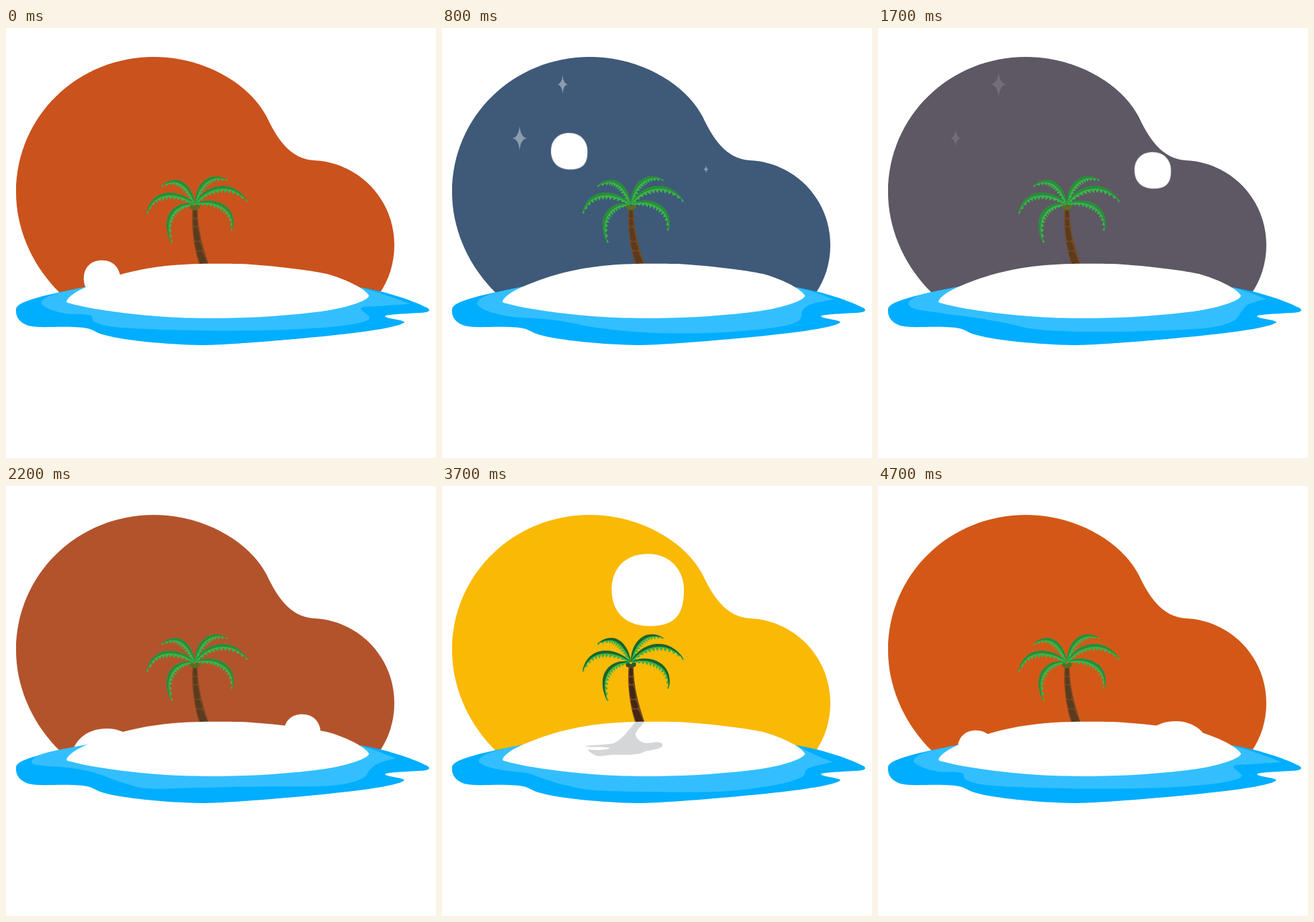
Animation, 640 px wide and 640 px high, one loop 4.8 s. Source, as an HTML page:

```html
<!DOCTYPE html>
<html lang="en">
<head>
<meta charset="utf-8">
<title>Island day and night</title>
<style>
  html, body { margin: 0; width: 100%; height: 100%; overflow: hidden; background: #fff; }
  svg { display: block; width: 100%; height: 100%; }
</style>
</head>
<body>
<svg viewBox="0 0 640 640" xmlns="http://www.w3.org/2000/svg">
  <defs>
    <path id="orb" d="M0-54C33-54 53-30 53.5-2C54 36 41 53 4 53.5C-34 54-54 32-54-1C-54-34-32-54 0-54Z"/>
    <path id="star" d="M0-19Q1.5-2 11 0Q1.5 2 0 19Q-1.5 2-11 0Q-1.5-2 0-19Z"/>
  </defs>
  <path id="sky" d="M80 394C40 355 15 300 15 245C15 130 108 43 220 43C300 43 365 87 388 132C402 162 422 195 458 197C525 200 578 255 578 323C578 350 570 375 556 395Z"/>
  <g id="stars" fill="#fff">
    <use href="#star"/><use href="#star"/><use href="#star"/>
  </g>
  <use id="moon" href="#orb" fill="#fff"/>
  <use id="sun" href="#orb" fill="#fff"/>
  <g id="palm">
    <path fill="#754a22" d="M278 266C275 295 280 330 288 353L302 353C293 325 285 300 285 266Z"/>
    <path id="bark"/>
    <path id="leaves" fill="#39b54a"/>
    <path id="ribs"/>
    <g id="nuts">
      <circle cx="277" cy="266.5" r="3.2"/><circle cx="281.5" cy="268" r="3.2"/><circle cx="285.5" cy="266" r="3.2"/>
    </g>
  </g>
  <path fill="#00aeff" d="M527 386C560 391 600 403 628 417C634 423 625 424 605 424.5C585 426 568 426 564 429C566 433 592 434 593 438C585 446 520 455 440 462C350 470 310 472 290 472C240 471 170 465 140 455C128 450 128 446 100 445C70 444 50 447 33 443C18 438 14 428 15 418C17 406 60 397 125 384Z"/>
  <path id="shallows" fill="#33bfff"/>
  <path fill="#fff" d="M90 407C92 400 105 391 125 383C170 364 220 352 290 351C310 350.5 340 351 350 351C400 354 450 360 478 366C510 375 535 389 540 398C542 405 505 418 460 423C400 430 350 432 300 432C220 432 130 420 96 410C91 409 90 408 90 407Z"/>
  <path id="shadow" fill="#cacbce" d="M288 351L301 351C297 358 289 362 288 370C290 379 300 385 312 382C322 380 330 382 328 387C322 394 308 392 300 396C292 401 270 400 255 400C245 401 235 402 231 402C224 399 218 395 217 392C230 394 245 393 251 390C240 387 220 390 212 387C222 385 240 386 255 383C268 378 278 363 288 351Z"/>
</svg>
<script>
const LOOP = 4800, STEP = 100, QUARTER = 1200, DUSK = -35;
const MIDNIGHT = DUSK + QUARTER, NOON = DUSK + 3 * QUARTER, FADE = 620;
const $ = id => document.getElementById(id);
const lerp = (a, b, k) => a + (b - a) * k;
const mix = (a, b, k) => a.map((v, i) => lerp(v, b[i], k));
const rgb = c => `rgb(${c.map(Math.round)})`;
const fmt = p => p.map(v => v.toFixed(2)).join(' ');

const SKY = [[208, 82, 25], [0, 92, 161], [208, 82, 25], [255, 198, 2]];

// time, x, y along the arc shared by sun and moon
const ARC = [
  [-400, 156, 465], [-200, 150, 415], [-100, 146, 391], [0, 143, 373], [400, 147.5, 271],
  [800, 189.5, 183.5], [1300, 306.5, 155], [1700, 409, 212],
  [2200, 441, 367], [2300, 443, 404], [2500, 446, 470]
];

// lower edge of the shallow water at dusk, midnight, dawn and noon
const SHORES = [
  '53,408 64,418 90,425 124,427 131,438 170,446 290,450 410,449 500,443 541,433 528,417 556,414 602,411',
  '53,408 65,421 104,431 154,435 208,437 256,446 319,455 396,456 486,448 525,438 541,421 549,409 575,401',
  '36,410 47,415 96,418 130,426 165,441 205,451 280,448 370,446 480,446 529,436 542,422 556,413 581,406',
  '55,408 66,417 92,423 125,427 150,434 185,445 232,454 400,456 490,446 533,434 545,422 560,416 579,411'
].map(s => s.split(' ').map(p => p.split(',').map(Number)));

function arcPoint(time) {
  const last = ARC.length - 1;
  if (time <= ARC[0][0]) return ARC[0].slice(1);
  if (time >= ARC[last][0]) return ARC[last].slice(1);
  const i = ARC.findIndex(k => k[0] > time) - 1;
  const a = ARC[i], b = ARC[i + 1], span = b[0] - a[0], u = (time - a[0]) / span;
  const slope = (n, axis) => {
    const p = ARC[Math.max(0, n - 1)], q = ARC[Math.min(last, n + 1)];
    return (q[axis] - p[axis]) / (q[0] - p[0]) * span;
  };
  return [1, 2].map(axis =>
    (2 * u ** 3 - 3 * u * u + 1) * a[axis] + (u ** 3 - 2 * u * u + u) * slope(i, axis) +
    (3 * u * u - 2 * u ** 3) * b[axis] + (u ** 3 - u * u) * slope(i + 1, axis));
}

function smooth(points) {
  let d = 'M' + fmt(points[0]);
  for (let i = 0; i < points.length - 1; i++) {
    const a = points[i], b = points[i + 1];
    const before = points[i - 1] || a, after = points[i + 2] || b;
    const c1 = a.map((v, k) => v + (b[k] - before[k]) / 6);
    const c2 = b.map((v, k) => v - (after[k] - a[k]) / 6);
    d += 'C' + [c1, c2, b].map(fmt).join(' ');
  }
  return d;
}

function shallows(edge) {
  const [x, y] = edge[0], [tipX, tipY] = edge[edge.length - 1];
  return smooth([[125, 384], [x + 19, y - 12], ...edge]) +
    `Q${fmt([tipX - 35, tipY - 14])} 527 386Z`;
}

// control points of each frond after the crown, and the side its leaflets hang on
const CROWN = [281, 262];
const FRONDS = [
  [[279, 238], [258, 212], [231, 235], -1],
  [[262, 240], [217, 234], [209, 276], -1],
  [[252, 255], [226, 280], [246, 320], -1],
  [[281, 232], [303, 210], [330, 226], 1],
  [[295, 232], [338, 222], [360, 258], 1],
  [[305, 248], [348, 262], [337, 302], 1]
];

function buildPalm() {
  let leaves = '', ribs = '', bark = '';
  for (const [c1, c2, tip, side] of FRONDS) {
    const at = (t, offset) => {
      const s = 1 - t;
      const p = [0, 1].map(k => s ** 3 * CROWN[k] + 3 * s * s * t * c1[k] + 3 * s * t * t * c2[k] + t ** 3 * tip[k]);
      const v = [0, 1].map(k => s * s * (c1[k] - CROWN[k]) + 2 * s * t * (c2[k] - c1[k]) + t * t * (tip[k] - c2[k]));
      const n = Math.hypot(...v) || 1;
      return [p[0] - side * v[1] / n * offset, p[1] + side * v[0] / n * offset];
    };
    const spine = `M${CROWN}C${c1} ${c2} ${tip}`;
    const teeth = 13, inner = [], rib = [];
    for (let i = teeth; i > 0; i--) {
      const t = i / teeth, reach = 11 * Math.sin(Math.PI * Math.min(1, t * 0.92 + 0.04)) ** 0.7;
      inner.push(at(t, reach), at(t - 0.055, reach * 0.5));
      rib.push(at(t, 4.2 * Math.sin(Math.PI * t) ** 0.7));
    }
    leaves += spine + 'L' + inner.map(fmt).join('L') + 'Z';
    ribs += spine + 'L' + rib.map(fmt).join('L') + 'Z';
  }
  const left = y => 278 - 3 * Math.sin((y - 268) / 84 * 2) + 12.5 * ((y - 268) / 84) ** 2;
  const width = y => 7 + 6 * (y - 268) / 84;
  [[271, 283], [284.5, 295], [296.5, 317], [318.5, 331], [332.5, 353]].forEach(([top, bottom]) => {
    const a = left(top) + 1.2, b = left(bottom) + 1.2;
    const wa = width(top) - 2.4, wb = width(bottom) - 2.4;
    bark += `M${fmt([a + 1, top])}L${fmt([a + wa - 1, top])}L${fmt([a + wa, top + 2])}` +
      `L${fmt([b + wb, bottom - 2])}L${fmt([b + wb - 2, bottom])}L${fmt([b + 2, bottom])}` +
      `L${fmt([b, bottom - 2])}L${fmt([a, top + 2])}Z`;
  });
  $('leaves').setAttribute('d', leaves);
  $('ribs').setAttribute('d', ribs);
  $('bark').setAttribute('d', bark);
}

function placeOrb(id, time, scale) {
  const local = time > 2600 ? time - LOOP : time;
  $(id).setAttribute('transform', `translate(${fmt(arcPoint(local))}) scale(${scale})`);
}

function draw(time) {
  const phase = (time - DUSK) % LOOP / QUARTER;
  const from = Math.floor(phase), to = (from + 1) % 4, k = phase - from;
  const near = peak => Math.max(0, 1 - Math.abs(time - peak) / FADE);
  const day = near(NOON);

  $('sky').setAttribute('fill', rgb(mix(SKY[from], SKY[to], k)));
  $('shallows').setAttribute('d', shallows(SHORES[from].map((p, i) => mix(p, SHORES[to][i], k))));
  placeOrb('moon', time, 0.505);
  placeOrb('sun', time - LOOP / 2, 1);

  const swing = Math.cos((time - 800) / 900 * Math.PI);
  const twinkles = [[179.5, 84, 0.85 - 0.15 * swing], [115.5, 164, 0.82 + 0.14 * swing], [393, 210.3, 0.5 - 0.17 * swing]];
  twinkles.forEach(([x, y, s], i) =>
    $('stars').children[i].setAttribute('transform', `translate(${x} ${y}) scale(${s.toFixed(3)})`));
  $('stars').setAttribute('opacity', near(MIDNIGHT));

  $('shadow').setAttribute('opacity', day);
  $('ribs').setAttribute('fill', rgb(mix([42, 140, 58], [20, 88, 36], day)));
  $('bark').setAttribute('fill', rgb(mix([91, 58, 30], [60, 33, 20], day)));
  $('nuts').setAttribute('fill', rgb(mix([88, 112, 34], [48, 72, 26], day)));
}

buildPalm();
const start = performance.now();
function tick() {
  const elapsed = (performance.now() - start) % LOOP;
  draw(Math.floor(elapsed / STEP) * STEP);
  requestAnimationFrame(tick);
}
tick();
</script>
</body>
</html>
```
